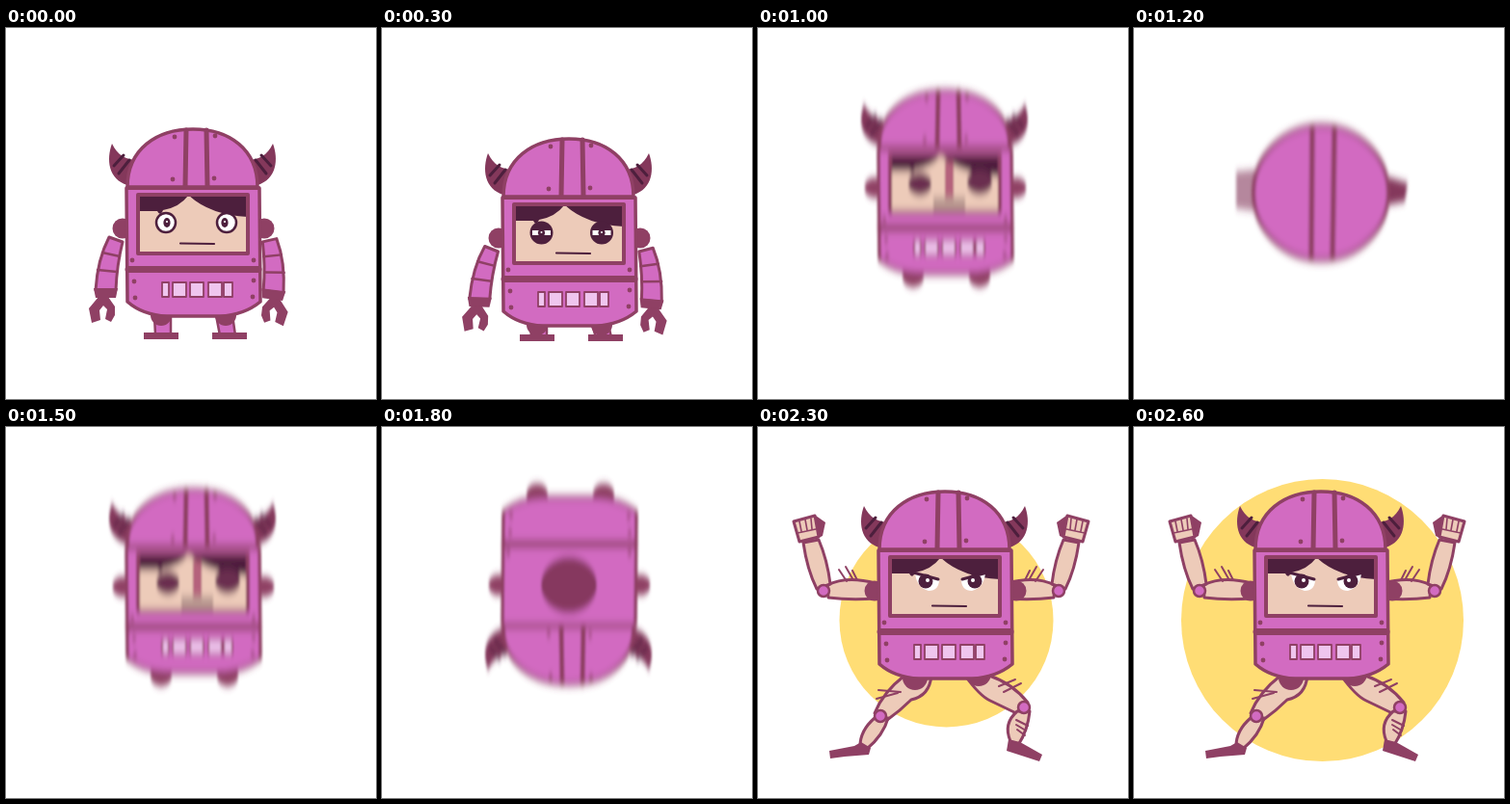
Recreate the animation shown at these times as an HTML page. Size 384 by 385 pixels, loop 2800 ms.

```html
<!DOCTYPE html>
<html>
<head>
<meta charset="utf-8">
<style>
html, body { margin: 0; width: 100%; height: 100%; overflow: hidden; background: #fff; }
svg { display: block; width: 100%; height: 100%; }
</style>
</head>
<body>
<svg viewBox="0 0 384 385">
  <defs>
    <filter id="blur" x="-20%" y="-20%" width="140%" height="140%"><feGaussianBlur stdDeviation="1.2 4.5"/></filter>
    <filter id="haze" x="-20%" y="-20%" width="140%" height="140%"><feGaussianBlur stdDeviation="1.8 4"/></filter>
  </defs>
  <g id="scene" stroke-linejoin="round" stroke-linecap="round"></g>
</svg>
<script>
const PINK = '#d26bc1', DARK = '#8f4064', HORN = '#84385b', HAIR = '#4d1f3d';
const SKIN = '#edcbb9', GLASS = '#efc5ee', YELLOW = '#ffdd75';

const path = (d, fill = 'none', stroke = DARK, width = 3) =>
  `<path d="${d}" fill="${fill}" stroke="${stroke}" stroke-width="${width}"/>`;
const shape = (d, fill) => path(d, fill, 'none');
const dot = (x, y, r, fill = DARK, stroke = 'none', width = 2.5) =>
  `<circle cx="${x}" cy="${y}" r="${r}" fill="${fill}" stroke="${stroke}" stroke-width="${width}"/>`;
const group = (transform, content) => `<g transform="${transform}">${content}</g>`;
const mirror = (sum, content) => group(`translate(${sum} 0) scale(-1 1)`, content);
const blurred = (content, id = 'blur') => `<g filter="url(#${id})">${content}</g>`;

const horn = shape('M110 120C104 136 106 157 126 163L137 137C124 137 116 132 110 120Z', HORN) +
  path('M112 143L122 132M117 151L128 137', 'none', HAIR, 3);
const horns = horn + mirror(387, horn);
const shoulders = dot(121, 208, 10.5) + dot(268, 208, 10.5);

const eyes = {
  open: [166, 229].map(x => dot(x, 202, 10, '#fff', HAIR, 2.5) +
    `<ellipse cx="${x + (x < 200 ? 1 : -2)}" cy="202" rx="3.6" ry="5" fill="${HAIR}"/>` +
    dot(x + (x < 200 ? 1 : -2), 201, 1.1, '#fff')).join(''),
  narrow: [165.5, 228].map(x => dot(x, 202.5, 12, HAIR) +
    shape(`M${x - 9.5} 200h19v5h-19z`, '#fff') + dot(x, 202.5, 3.6, HAIR) + dot(x, 202, 1, '#fff')).join(''),
  angry: [0, 1].map(side => {
    const eye = shape('M163 190L188 196Q188 208 177 208Q165 205 163 190Z', '#fff') +
      dot(174, 198, 7.5, HAIR) + dot(176, 197, 2, '#fff') + path('M161 189L187 196', 'none', HAIR, 3);
    return side ? mirror(399, eye) : eye;
  }).join(''),
  smear: dot(168, 204, 12, '#6b2d50') + dot(230, 202, 13, '#6b2d50') +
    shape('M194 180h9v38h-9z', '#b5627c') + shape('M182 218h33v14h-33z', '#b99a91')
};

const face = look =>
  shape('M138 174H251V234H138Z', SKIN) +
  shape('M139 174H189Q180 186 163 189Q160 196 157 190L139 190Z', HAIR) +
  shape('M190 174H251V196Q212 194 190 174Z', HAIR) +
  eyes[look] +
  (look === 'smear' ? '' : path('M181 223.5L216 224', 'none', HAIR, 2.2)) +
  path('M137 173H251V234H137Z', 'none', DARK, 4);

const windows = [[162, 7], [173, 14], [191, 14], [210, 14], [226, 9]]
  .map(([x, w]) => path(`M${x} 264h${w}v15h${-w}z`, GLASS, DARK, 1.8)).join('');
const bolts = [[175, 113], [217, 112], [173, 157], [216, 156], [131, 241], [257, 241],
  [133, 263], [257, 262], [134, 280], [256, 279]].map(([x, y]) => dot(x, y, 2.4)).join('');

const body = look => horns +
  path('M126 165C126 126 156 105 194 105S261 126 261 165Z', PINK, DARK, 3.5) +
  path('M187 106L186 164M208 106L209 164', 'none', DARK, 5) +
  path('M125 166H263L264 284Q247 298 222 299H167Q142 298 126 284Z', PINK, DARK, 3.5) +
  path('M126 166H262', 'none', DARK, 4) +
  path('M127 250.5H262', 'none', DARK, 7) +
  (look ? face(look) + windows : '') + bolts;

const arm = (angle, size = 1) =>
  group(`translate(121 208) rotate(${angle}) scale(${size}) translate(-121 -208)`,
    path('M107 217Q95 240 93 272H114Q115 246 121 222Z', PINK) +
    path('M100 233L118 237M95 251L115 253', 'none', DARK, 2.5) +
    shape('M91 270H116L114 280H93Z', DARK) +
    shape('M96 279L86 291L89 306L98 303L97 293L101 288L105 292L103 302L109 305L113 298V289L106 279Z', DARK));
const arms = (left, right, size) => arm(left, size) + mirror(389, arm(right, size)) + shoulders;

const leg = (hip, x, y, tilt) =>
  path(`M154 ${hip}L${x - 6} ${y}H${x + 10}L171 ${hip}Z`, PINK, DARK, 2.5) +
  dot(161, hip, 11) +
  group(`translate(${x} ${y}) rotate(${tilt})`, shape('M-18 -3H18V4H-18Z', DARK));
const legs = (hip, y, tilt, left = 161, right = left) =>
  leg(hip, left, y, tilt) + mirror(389, leg(hip, right, y, tilt));

const robot = (dy, look, left, right, footY, tilt, footL, footR, size) =>
  legs(298 + dy, footY, tilt, footL, footR) +
  group(`translate(0 ${dy})`, arms(left, right, size) + body(look));

const heroArm =
  path('M122 162Q92 154 72 164L73 177Q95 180 122 178Z', SKIN) +
  path('M61 168Q51 148 47 120L63 117Q72 138 75 163Z', SKIN) +
  dot(68, 170, 6, PINK, DARK) +
  shape('M60 92L70 99L67 113L61 116Z', DARK) +
  path('M37 98L59 92L63 114L43 119Z', SKIN) +
  path('M43 98l2 10M49 96l2 11M55 95l1 11M41 110l19 -4', 'none', DARK, 1.6) +
  path('M84 148l8 12M91 145l8 14M98 149l5 10', 'none', DARK, 2);
const heroLegs =
  path('M152 258Q130 275 121 297L134 304Q148 294 159 283Q178 279 180 258Z', SKIN) +
  path('M121 302Q106 315 106 331L113 334Q130 320 135 302Z', SKIN) +
  shape('M74 336L100 331L107 327L117 333L115 340L90 342L75 344Z', DARK) +
  path('M215 258Q230 279 241 284L268 297L280 286Q264 266 240 258Z', SKIN) +
  path('M269 295Q254 308 262 326L270 330Q280 315 282 295Z', SKIN) +
  shape('M260 324L272 327L295 340L292 347L258 336Z', DARK) +
  dot(163, 260, 13) + dot(229, 256, 13) +
  dot(127, 300, 6, PINK, DARK) + dot(276, 291, 6, PINK, DARK) +
  path('M125 273l23 2M123 282l22 -6M250 269l17 -7M255 275l18 -9M268 304l12 6M268 309l10 6M269 314l8 6', 'none', DARK, 2);
const hero = radius => dot(195.5, 200.5, radius, YELLOW) + heroArm + mirror(380, heroArm) + heroLegs +
  group('translate(0 -38)', shoulders + body('angry'));

// Somersault views: face, crown of the helmet, back, soles
const stubs = dot(161, 302, 11) + dot(230, 302, 11);
const frontView = blurred(group('translate(0 -38) scale(1 .98)', stubs + shoulders + body('smear')));
const ball = dot(194, 171, 70, PINK, DARK, 4);
const crownView = blurred(
  `<g opacity=".6">${shape('M106 149L126 147V190L106 187Z', HORN)}</g>` +
  shape('M262 154L284 161L281 180L262 184Z', HORN) + ball +
  path('M185 106L184 236M208 106L206 236', 'none', DARK, 5.5), 'haze');
const backView = blurred(group('translate(0 372) scale(1 -1)', stubs + shoulders + body()) + dot(194, 164, 29, '#86395f'));
const soleView = blurred(group('translate(0 -37)', shoulders) + ball + dot(161, 171, 15) + dot(229, 171, 15), 'haze');

const small = hero(111), big = hero(146.5);
const timeline = [
  [0, robot(0, 'open', 0, -7, 319, 0, 161, 157)],
  [200, robot(5, 'narrow', 1, -6, 320, 0, 161, 157)],
  [300, robot(10, 'narrow', 2, -5, 321, 0, 161, 157)],
  [700, robot(-22, 'narrow', 19, 17, 306, -22, 162.5)],
  [800, robot(-36, 'narrow', 72, 70, 288, -32, 162)],
  [900, robot(-40, 'narrow', 60, 58, 274, -20, 162, 162, .55)],
  [1000, frontView], [1200, crownView], [1300, backView], [1400, soleView],
  [1500, frontView], [1700, crownView], [1800, backView], [1900, soleView], [2000, frontView],
  [2100, small], [2200, big], [2300, small], [2400, big], [2500, small], [2600, big]
];

const scene = document.getElementById('scene');
let shown;
function draw() {
  const time = performance.now() % 2800;
  const pose = timeline.findLast(([start]) => start <= time);
  if (pose !== shown) {
    shown = pose;
    scene.innerHTML = pose[1];
  }
  requestAnimationFrame(draw);
}
draw();
</script>
</body>
</html>
```
